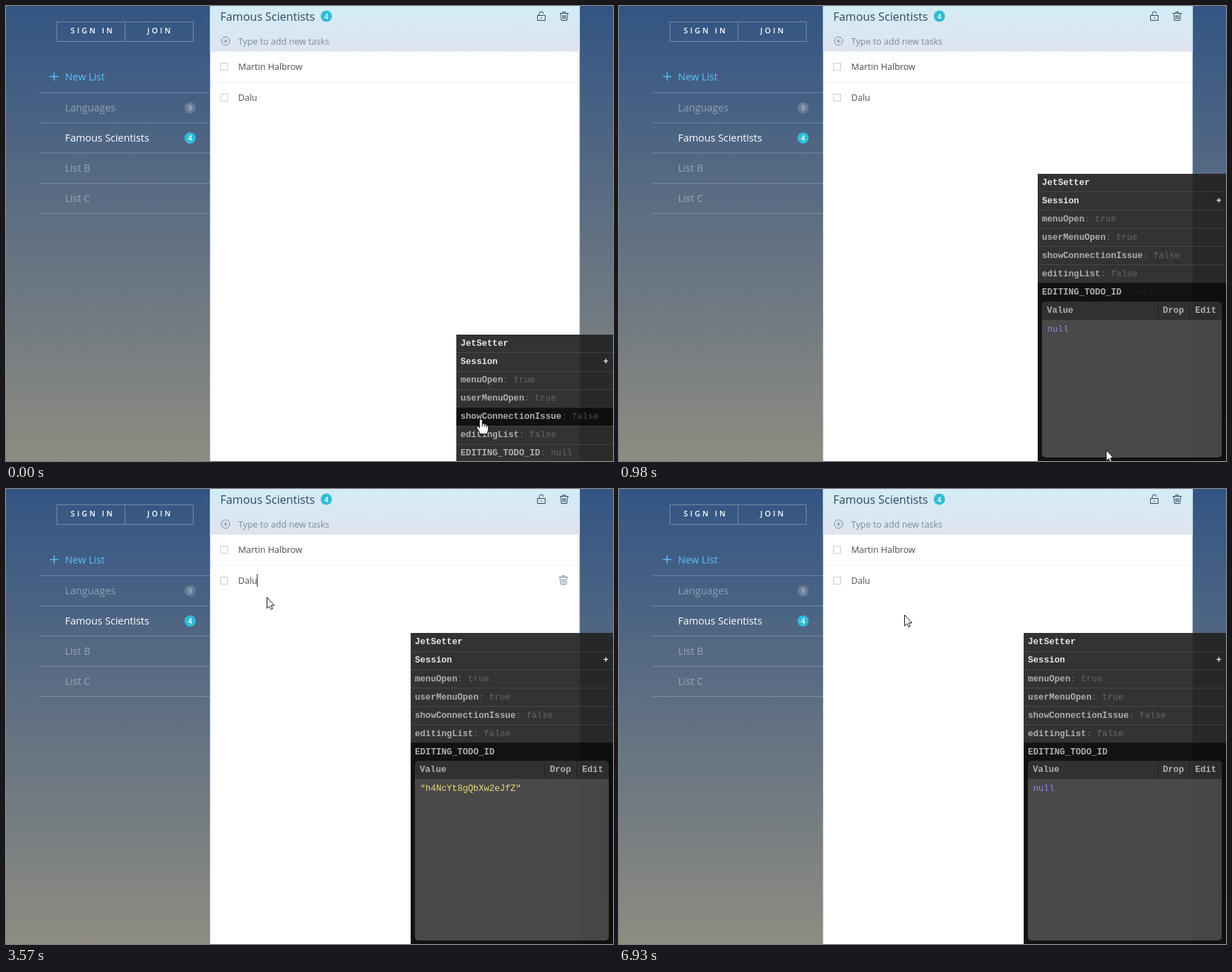
An HTML page with a canvas for the animation above (7.14 s loop, 864 px wide and 648 px high).

```html
<!DOCTYPE html>
<html lang="en">
<head>
<meta charset="utf-8">
<title>Todo list with state inspector</title>
<style>
html, body { margin: 0; width: 100%; height: 100%; overflow: hidden; }
canvas { display: block; }
</style>
</head>
<body>
<canvas id="stage" width="864" height="648"></canvas>
<script>
const ctx = document.getElementById('stage').getContext('2d');
const LOOP = 7140, STEP = 70, W = 864, H = 648, ROW = 26.05, CHAR = 7.56;
const OPEN_AT = 840, BLINK = 490;
const SANS = '"Open Sans", sans-serif', MONO = '"Liberation Mono", monospace';
const ICON = '#2b4a60', MUTED = '#778b9b', TEAL = '#2fbcd6', SKY = '#5ac0fb';
const BRIGHT = '#e6e6e6', KEY = '#aeaeae';

// The pointer eases out to each stop in turn.
const START = { x: 676, y: 588 };
const STOPS = [
  { from: 0, to: 280, x: 693, y: 632 },
  { from: 1315, to: 2520, x: 416, y: 184 },
  { from: 2520, to: 3010, x: 367, y: 134 },
  { from: 3430, to: 3920, x: 378, y: 185 },
  { from: 4410, to: 4690, x: 403, y: 105 },
  { from: 4690, to: 5180, x: 408, y: 90 },
  { from: 5460, to: 6020, x: 406, y: 179 }
];
const TASKS = [
  { name: 'Martin Halbrow', y: 86, from: 5320, to: 6930, caret: 411, id: '"Kd7xWq3mTzLp9vRsB"' },
  { name: 'Dalu', y: 130, from: 3220, to: 4340, caret: 357, id: '"h4NcYt8gQbXw2eJfZ"' }
];
const LISTS = ['New List', 'Languages', 'Famous Scientists', 'List B', 'List C'];
const STATE = {
  menuOpen: true, userMenuOpen: true, showConnectionIssue: false,
  editingList: false, EDITING_TODO_ID: null
};
const HAND = new Path2D('M-2 13V2Q-2 .5 0 .5Q2 .5 2 2V7Q5 5.5 5.5 8Q8 7 8.3 9Q10.5 8.5 10.5 11V15Q10.5 18 8.5 21.5H-1Q-2 18 -5.5 13.5Q-6.5 11 -4.5 10.5Q-3.5 10.5 -2 13Z');
const KNUCKLES = new Path2D('M2 7V11M5.5 8V11.5M8.3 9V12');
const ARROW = new Path2D('M.5 .5V16L4 12.8L6.2 17.6L8.6 16.5L6.4 11.8H11Z');
const IBEAM = new Path2D('M-3 -8.5H-1L0 -7.5L1 -8.5H3M0 -7.5V7.5M-3 8.5H-1L0 7.5L1 8.5H3');

const white = a => `rgba(255,255,255,${a})`;
const black = a => `rgba(0,0,0,${a})`;
const progress = (t, from, to) => Math.min(1, Math.max(0, (t - from) / (to - from)));
const easeOut = (p, power) => 1 - (1 - p) ** power;
const swing = p => .5 - Math.cos(Math.PI * p) / 2;
const editing = t => TASKS.find(task => t >= task.from && t < task.to);

function pointerAt(t) {
  let { x, y } = START;
  for (const stop of STOPS) {
    const p = easeOut(progress(t, stop.from, stop.to), 1.45);
    x += (stop.x - x) * p;
    y += (stop.y - y) * p;
  }
  return { x: Math.round(x), y: Math.round(y) };
}

function panelAt(t) {
  if (t < OPEN_AT) return { left: 641, top: 468 };
  return {
    left: Math.round(641 - 65 * easeOut(progress(t, OPEN_AT, 1120), 1.7)),
    top: 468 - 262.6 * swing(progress(t, 715, 1060))
  };
}

function box(x, y, w, h, color) {
  ctx.fillStyle = color;
  ctx.fillRect(x, y, w, h);
}
function frame(x, y, w, h, color) {
  ctx.strokeStyle = color;
  ctx.lineWidth = 1;
  ctx.strokeRect(x + .5, y + .5, w - 1, h - 1);
}
function text(str, x, y, font, color, align = 'left') {
  ctx.font = font;
  ctx.fillStyle = color;
  ctx.textAlign = align;
  ctx.fillText(str, x, Math.round(y));
}
const sans = (str, x, y, size, color) => text(str, x, y, `${size}px ${SANS}`, color);
const mono = (str, x, y, color) => text(str, x, y, `12.6px ${MONO}`, color);
const boldMono = (str, x, y, color) => text(str, x, y, `bold 12.6px ${MONO}`, color);

function gradient(height, from, to) {
  const g = ctx.createLinearGradient(0, 0, 0, height);
  g.addColorStop(0, from);
  g.addColorStop(1, to);
  return g;
}
function line(d, color, x = 0, y = 0, width = 1) {
  ctx.save();
  ctx.translate(x, y);
  ctx.strokeStyle = color;
  ctx.lineWidth = width;
  ctx.stroke(new Path2D(d));
  ctx.restore();
}
function badge(n, x, y, fill, color) {
  ctx.fillStyle = fill;
  ctx.beginPath();
  ctx.arc(x, y, 8, 0, 7);
  ctx.fill();
  text(n, x, y + 4, `600 10.5px ${SANS}`, color, 'center');
}
const trash = (x, y, color) =>
  line('M0 2.5H13M4.5 2.5V.5H8.5V2.5M1.7 2.5L2.5 12.5H10.5L11.3 2.5M4.6 5V10.5M6.5 5V10.5M8.4 5V10.5', color, x, y);

function drawSidebar() {
  box(0, 0, W, H, gradient(H, '#335584', '#8e8c81'));
  frame(72, 22, 195, 29, white(.3));
  box(169, 23, 1, 27, white(.3));
  ctx.letterSpacing = '3.24px';
  text('SIGN IN', 92, 39, `600 10.8px ${SANS}`, '#fff');
  text('JOIN', 201, 39, `600 10.8px ${SANS}`, '#fff');
  ctx.letterSpacing = '0px';
  line('M62.5 100.5H74.5M68.5 94.5V106.5', SKY, 0, 0, 1.5);
  LISTS.forEach((name, i) => {
    const color = i === 0 ? SKY : i === 2 ? '#fff' : white(.4);
    sans(name, 84, 106.4 + 43.2 * i, 14.4, color);
    box(48, 123 + 43 * i, 243, 1, white(.22));
  });
  badge('9', 262, 145, white(.17), white(.5));
  badge('4', 262, 188, TEAL, '#fff');
}

function drawList(t) {
  box(290.5, 0, 526, H, '#fff');
  box(290.5, 0, 526, 65, gradient(65, '#d2ecf5', '#dfe4ef'));
  sans('Famous Scientists', 305, 21, 16.2, ICON);
  badge('4', 456, 14.5, TEAL, '#fff');
  line('M.5 5.5H11.5V12.5H.5ZM3 5.5V3A3 3 0 0 1 9 3M6 8V10', ICON, 756, 8);
  trash(788, 8, ICON);
  line('M306.5 50a6 6 0 1 0 12 0a6 6 0 1 0 -12 0M309.5 50H315.5M312.5 47V53', MUTED);
  sans('Type to add new tasks', 330.5, 55, 12.6, MUTED);
  box(291, 108, 525, 1, '#e8f4f7');
  for (const task of TASKS) {
    frame(305, task.y - 5, 11, 11, '#ccc');
    sans(task.name, 330.5, task.y + 5, 12.6, '#4d4d4d');
    if (task !== editing(t)) continue;
    trash(787, task.y - 7, MUTED);
    const caretOn = Math.floor((t - task.from) / BLINK) % 2 === 0;
    if (caretOn) box(task.caret, task.y - 9, 1, 18, '#333');
  }
}

function drawPanel(t, pointer) {
  const { left, top } = panelAt(t);
  const open = t >= OPEN_AT;
  const x = left + 6, width = W - left;
  const rowTop = i => Math.round(top + ROW * i - .6);
  const baseline = i => top + 16 + ROW * i;
  const hovered = open ? 6 : Math.floor((pointer.y - top) / ROW);

  box(left, Math.round(top - .1), width, H, 'rgba(34,34,34,.92)');
  for (let i = 1; i < 7; i++) box(left, rowTop(i), width, 1, white(.1));
  const hoverEnd = open ? H : rowTop(hovered + 1);
  box(left, rowTop(hovered), width, hoverEnd - rowTop(hovered), black(.65));

  boldMono('JetSetter', x, baseline(0), BRIGHT);
  boldMono('Session', x, baseline(1), BRIGHT);
  boldMono('+', 850, baseline(1), BRIGHT);
  Object.entries(STATE).forEach(([key, value], n) => {
    const i = n + 2;
    boldMono(key, x, baseline(i), KEY);
    ctx.globalAlpha = open && i === 6 ? 1 - progress(t, 770, 1050) : 1;
    mono(': ' + value, x + key.length * CHAR, baseline(i), hovered === i ? '#4c4c4c' : '#676767');
    ctx.globalAlpha = 1;
  });
  if (open) drawValue(t, left, Math.round(top + 181.8));
}

function drawValue(t, left, top) {
  const x = left + 6, width = 858 - x;
  const task = editing(t);
  ctx.save();
  ctx.beginPath();
  ctx.roundRect(x, top, width, 643 - top, 5);
  ctx.clip();
  box(x, top, width, 26, white(.13));
  box(x, top + 26, width, H - top, white(.23));
  for (const divider of [767, 812]) box(divider, top, 1, 26, black(.35));
  boldMono('Value', left + 13, top + 16, KEY);
  boldMono('Drop', 774, top + 16, KEY);
  boldMono('Edit', 820, top + 16, KEY);
  mono(task ? task.id : 'null', left + 13.5, top + 43, task ? '#e6db74' : '#a082e0');
  ctx.restore();
}

function drawPointer(t, { x, y }) {
  const task = editing(t);
  const overInput = task && Math.abs(y - task.y) < 22;
  const overLink = t < OPEN_AT || y < 152;
  const shape = overInput ? IBEAM : overLink ? HAND : ARROW;
  ctx.save();
  ctx.translate(x, y);
  ctx.lineWidth = 1;
  ctx.strokeStyle = '#111';
  ctx.fillStyle = '#fff';
  if (shape !== IBEAM) ctx.fill(shape);
  ctx.stroke(shape);
  if (shape === HAND) ctx.stroke(KNUCKLES);
  ctx.restore();
}

function draw(now) {
  const t = Math.floor(now % LOOP / STEP) * STEP;
  const pointer = pointerAt(t);
  drawSidebar();
  drawList(t);
  drawPanel(t, pointer);
  drawPointer(t, pointer);
  requestAnimationFrame(draw);
}
draw(performance.now());
</script>
</body>
</html>
```
